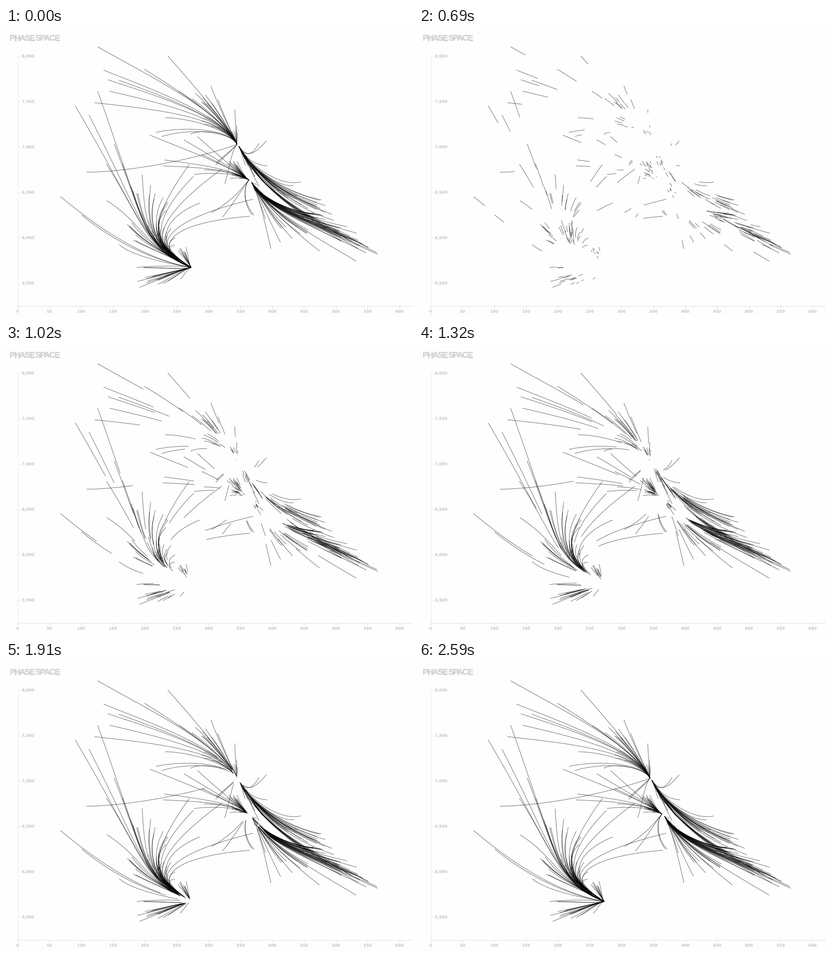
A matplotlib script that plays this animation: 888 by 631 pixels, repeating every 4.62 s.

```python
import numpy as np
import matplotlib.pyplot as plt
from matplotlib.animation import FuncAnimation
from matplotlib.collections import LineCollection
from matplotlib.patches import PathPatch
from matplotlib.textpath import TextPath
from matplotlib.transforms import Affine2D

W, H, DPI = 888, 631, 100
INTERVAL, LOOP = 30, 4620
PX = 72 / DPI
CHANGES = np.cumsum([330] + [180] * 3 + [150] * 4 + [140] + [150] * 2
                    + [120] * 5 + [80])
SPAN = 14.4  # steps a trail needs to arrive
rng = np.random.default_rng(11)

# Four places where the trails end
TOP, LEFT, MID, SIDE, TAIL = (504, 254), (404, 523), (530, 332), (508, 258), (536, 337)
trails = []


def band(n, a, b, sx, sy):
    """Random starts scattered around the segment from a to b."""
    u = rng.random((n, 1))
    pts = np.array(a) + u * np.subtract(b, a) + rng.normal(0, (sx, sy), (n, 2))
    return [tuple(p) for p in pts]


def trace(p, a, b, q):
    """Points of a cubic and their share of its length."""
    t = np.linspace(0, 1, 80)[:, None]
    pts = (1 - t)**3 * p + 3 * t * (1 - t)**2 * a + 3 * t**2 * (1 - t) * b + t**3 * q
    arc = np.r_[0, np.cumsum(np.hypot(*np.diff(pts, axis=0).T))]
    return pts, arc / arc[-1]


def flow(starts, sink, angle, gate, pull=.45, reach=.22, cap=90):
    """Trails that set off towards the gate and reach the sink at the angle."""
    sink, gate = np.array(sink, float), np.array(gate, float)
    heading = np.array([np.cos(np.radians(angle)), np.sin(np.radians(angle))])
    for p in np.array(starts, float):
        gap = np.hypot(*(sink - p))
        a = p + pull * (gate - p)
        b = sink - heading * min(reach * gap, cap)
        outer = p[0] < 193 or p[1] < 80
        lag = 1.1 if outer else rng.uniform(.1, 1.2)
        trails.append((*trace(p, a, b, sink), lag))


# Upper left, down to the top sink
flow([(200, 41), (353, 61), (302, 90), (213, 92), (222, 113), (246, 114),
      (226, 138), (193, 163), (347, 196), (327, 228), (340, 237),
      (403, 232), (377, 138), (447, 126)], TOP, 64, (470, 195), .4)
flow(band(9, (405, 158), (455, 158), 8, 8), TOP, 64, (480, 205))
flow(band(6, (428, 203), (460, 212), 6, 8), TOP, 64, (480, 210))
flow([(499, 178)] + band(8, (493, 215), (503, 246), 4, 5), TOP, 80, TOP)
flow([(176, 315)], TOP, -20, (350, 312), .6, .3)
flow(band(3, (451, 284), (471, 340), 3, 3), TOP, -50, TOP)

# Falling and curling into the lower left sink
flow([(200, 138), (151, 170), (181, 190), (236, 253), (219, 297), (254, 296),
      (220, 377), (297, 320), (400, 298), (409, 324), (471, 308), (423, 382),
      (539, 374), (532, 411)], LEFT, 22, (304, 430), .95, .45, 110)
flow(band(12, (270, 350), (355, 378), 6, 12), LEFT, 24, (304, 440), .9, .45, 110)
flow(band(7, (266, 412), (285, 478), 5, 5), LEFT, 28, (318, 485), .7, .4)
flow(band(26, (310, 435), (362, 450), 9, 12), LEFT, 34, (325, 480), .8, .4)
flow([(119, 368), (165, 408), (247, 473), (285, 523)], LEFT, 10, (300, 520), .55, .3)
flow(band(18, (288, 545), (390, 550), 7, 8), LEFT, -12, LEFT)
flow(band(9, (375, 485), (390, 492), 4, 5), LEFT, 60, LEFT)

# Middle left, into the middle sink
flow([(314, 234), (345, 288), (342, 301), (388, 244), (418, 237), (427, 276),
      (410, 320), (432, 310)], MID, 36, (495, 308))
flow([(448, 403), (472, 413), (537, 408), (541, 409)], MID, -50, (508, 370), .75)
flow(band(28, (492, 288), (504, 326), 6, 5), MID, 36, (518, 323))

# Right, climbing to the side sink
flow([(643, 336), (628, 344), (591, 348), (684, 376), (711, 407)]
     + band(18, (605, 362), (690, 392), 9, 7), SIDE, 245, (578, 352), .75, .25)
flow(band(12, (690, 425), (790, 482), 8, 6), SIDE, 245, (590, 378), .8, .28, 110)
flow([(570, 301), (568, 246), (552, 252)], SIDE, 235, (526, 298), .85, .3)
flow(band(14, (518, 278), (558, 345), 4, 5), SIDE, 243, SIDE)

# Right, sweeping to the tail sink
flow([(811, 494), (809, 490), (786, 491), (744, 434), (765, 448)]
     + band(14, (720, 440), (790, 482), 8, 6)
     + band(20, (645, 408), (712, 415), 8, 5), TAIL, 241, (612, 404), .8, .24, 70)
flow([(764, 509), (684, 487), (625, 460), (599, 468), (578, 482), (566, 417)]
     + band(9, (608, 436), (655, 446), 6, 7), TAIL, 241, (556, 386), .6)
flow(band(9, (541, 348), (562, 376), 4, 6), TAIL, 245, TAIL)


def grown(step):
    """All trails as they stand after the given step."""
    segs = []
    for pts, arc, lag in trails:
        u = np.clip((step - lag) / SPAN, 0, 1)
        f = 1 - (1 - u)**1.6
        if f > 0:
            s = np.linspace(0, f, 50)
            segs.append(np.c_[np.interp(s, arc, pts[:, 0]),
                              np.interp(s, arc, pts[:, 1])])
    return segs


states = [grown(k) for k in range(len(CHANGES))]

fig = plt.figure(figsize=(W / DPI, H / DPI), dpi=DPI, facecolor="#fefefe")
ax = fig.add_axes([0, 0, 1, 1])
ax.set_xlim(0, W)
ax.set_ylim(H, 0)
ax.axis("off")


def rule_line(x0, y0, x1, y1, color):
    ax.plot([x0, x1], [y0, y1], color=color, lw=PX, solid_capstyle="butt")


def write(x, y, text, size, family, color, tracking=0, edge=0, center=False):
    """Bold text on baseline y, letter by letter with tracking."""
    def glyphs(s):
        return TextPath((0, 0), s, size=size, prop=dict(family=family, weight="bold"))

    if center:
        box = glyphs(text).get_extents()
        x -= (box.x0 + box.x1) / 2
    for i, c in enumerate(text):
        if c == " ":
            continue
        glyph = glyphs(c)
        dx = glyphs(text[:i + 1]).get_extents().x1 - glyph.get_extents().x1
        place = Affine2D().scale(1, -1).translate(x + dx + tracking * i, y)
        ax.add_patch(PathPatch(place.transform_path(glyph), facecolor=color,
                               edgecolor=color, lw=edge * PX))


def label(x, y, text, center=False):
    write(x, y + 3.2, text, 8.6, "DejaVu Sans", "#c6c6c6", center=center)


rule_line(25.5, 61, 25.5, H, "#ebebeb")
rule_line(25, 606.5, W, 606.5, "#dedede")
for i in range(6):
    y = 61.5 + 99.1 * i
    rule_line(25, y, 32, y, "#e2e2e2")
    label(34.6, y - .3, f"{8000 - 500 * i:,}")
for i in range(13):
    x = 25.5 + 69.43 * i
    rule_line(x, 606, x, 612, "#d6d6d6")
    label(x, 618.5, str(50 * i), center=True)
write(8, 27.5, "PHASE SPACE", 18, "Liberation Sans", "#d2d2d2", -1.8, .5)

lines = LineCollection([], colors=[(0, 0, 0, .62)], linewidths=.95 * PX,
                       capstyle="butt", zorder=3)
ax.add_collection(lines, autolim=False)


def draw(i):
    t = i * INTERVAL + 20
    step = np.count_nonzero(CHANGES <= t) - 1  # -1 is the full picture
    lines.set_segments(states[step])
    return lines,


anim = FuncAnimation(fig, draw, frames=LOOP // INTERVAL, interval=INTERVAL,
                     init_func=lambda: draw(0), repeat=True, repeat_delay=0)
plt.show()
```
